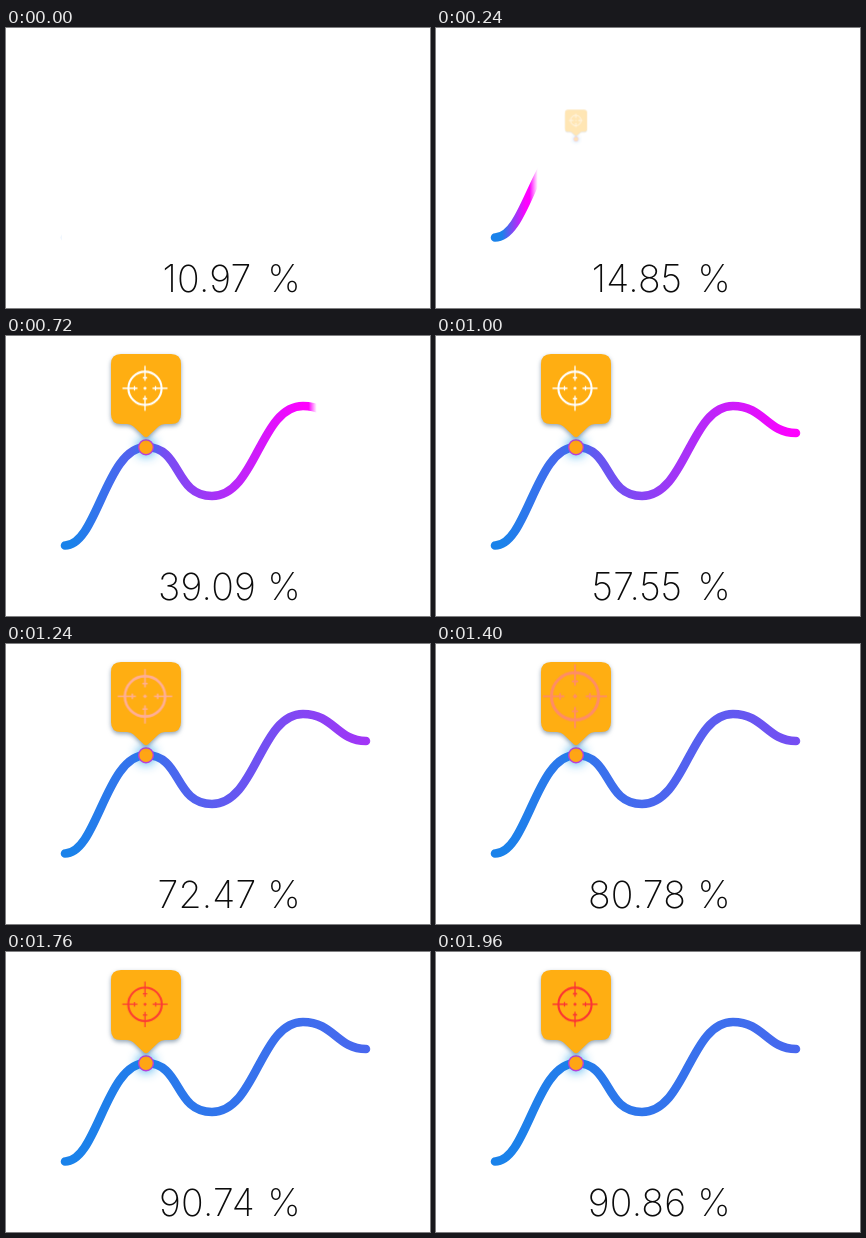
An HTML page for the animation above (2000 ms loop, 424 by 280 pixels).

```html
<!DOCTYPE html>
<html lang="en">
<head>
<meta charset="utf-8">
<title>Growth chart</title>
<style>
  html, body { margin: 0; width: 100%; height: 100%; overflow: hidden; background: #fff; }
  svg { display: block; width: 424px; height: 280px; }
  text {
    font: 250 37.5px Inter, "Helvetica Neue", "Liberation Sans", sans-serif;
    font-variation-settings: "opsz" 14;
    letter-spacing: .2px;
    fill: #0c0c0c;
  }
  .curve { fill: none; stroke: url(#ink); stroke-width: 8.6; stroke-linecap: round; }
  .pin { transform-origin: 140px 111px; animation: pop 2s infinite; }
  .bubble { fill: #ffae12; filter: drop-shadow(0 2.5px 2px rgba(40, 75, 110, .5)); }
  .dot { fill: #ffa514; stroke: #b83fd6; stroke-width: 1.4; filter: drop-shadow(0 0 6px rgba(0, 145, 230, .95)); }
  .aim { fill: none; stroke: #fff; stroke-width: 1.3; animation: heat 2s linear infinite, pulse 2s ease-in-out infinite; }
  .aim circle { stroke-width: 2.1; }
  @keyframes pop {
    0%, 10% { transform: scale(0); opacity: 0; animation-timing-function: ease-out; }
    20%, 100% { transform: none; opacity: 1; }
  }
  @keyframes heat {
    0%, 55% { stroke: #fff; }
    62% { stroke: #ffae98; }
    78% { stroke: #ff6a36; }
    90%, 100% { stroke: #fb3434; }
  }
  @keyframes pulse {
    0%, 54% { transform: scale(1); }
    70% { transform: scale(1.42); }
    90%, 100% { transform: scale(1); }
  }
</style>
</head>
<body>
<svg viewBox="0 0 424 280">
  <defs>
    <linearGradient id="ink" gradientUnits="userSpaceOnUse" x1="66" y1="0" x2="66" y2="0">
      <stop offset="0" stop-color="#1a82ea"/>
      <stop offset="1" stop-color="#f0f"/>
    </linearGradient>
    <linearGradient id="fade" gradientUnits="userSpaceOnUse" x1="0" y1="0" x2="0" y2="0">
      <stop offset="0" stop-color="#fff"/>
      <stop offset="1" stop-color="#000"/>
    </linearGradient>
    <mask id="wipe" maskUnits="userSpaceOnUse" x="0" y="0" width="424" height="280">
      <rect width="424" height="280" fill="url(#fade)"/>
    </mask>
    <path id="arm" d="M-22.5 0H-7.5M-10.5 -2.2V2.2"/>
  </defs>

  <g mask="url(#wipe)">
    <path class="curve" d="M59 209.5C91 209.5 100 111 140 111C176 111 168 160 206 160C250 160 254 70 297 70C328 70 331 97 360 97"/>
  </g>

  <g class="pin">
    <circle class="dot" cx="140" cy="111.3" r="7.4"/>
    <path class="bubble" d="M115 18H165Q175 18 175 28V78Q175 88 165 88H159Q155 88 152.500 90.500L142 100.500Q140 102 138 100.500L127.500 90.500Q125 88 121 88H115Q105 88 105 78V28Q105 18 115 18Z"/>
    <g transform="translate(139 52.300)">
      <g class="aim">
        <circle r="16.600"/>
        <use href="#arm"/>
        <use href="#arm" transform="rotate(90)"/>
        <use href="#arm" transform="rotate(180)"/>
        <use href="#arm" transform="rotate(270)"/>
        <path d="M-1.500 0H1.500M0 -1.500V1.500"/>
      </g>
    </g>
  </g>

  <text id="count" x="201" y="263.700" text-anchor="middle">10.97</text>
  <text x="295" y="263.700" text-anchor="end">%</text>
</svg>
<script>
  const LOOP = 2000, STEP = 40;
  const byId = id => document.getElementById(id);
  const ink = byId('ink'), fade = byId('fade'), count = byId('count');
  const clamp = v => Math.min(1, Math.max(0, v));
  const smooth = v => (v = clamp(v), v * v * (3 - 2 * v));

  function setSpan(gradient, from, to) {
    gradient.setAttribute('x1', from);
    gradient.setAttribute('x2', to);
  }

  function render(t) {
    count.textContent = (10.97 + 79.89 * smooth(t / 1800)).toFixed(2);

    const edge = 56 + 315 * smooth(t / 1000);
    setSpan(fade, edge - 8, edge);

    // Magenta rides the edge, then is pushed off past the end of the line.
    const rest = 1 - clamp((t - 1000) / 800);
    const share = 0.2 + 0.8 * rest * rest;
    const reach = Math.max(1, edge - 12 - 66);
    setSpan(ink, 66, 66 + reach / share);
  }

  const start = performance.now();
  function tick() {
    const t = (performance.now() - start) % LOOP;
    render(Math.floor(t / STEP) * STEP);
    requestAnimationFrame(tick);
  }
  tick();
</script>
</body>
</html>
```
